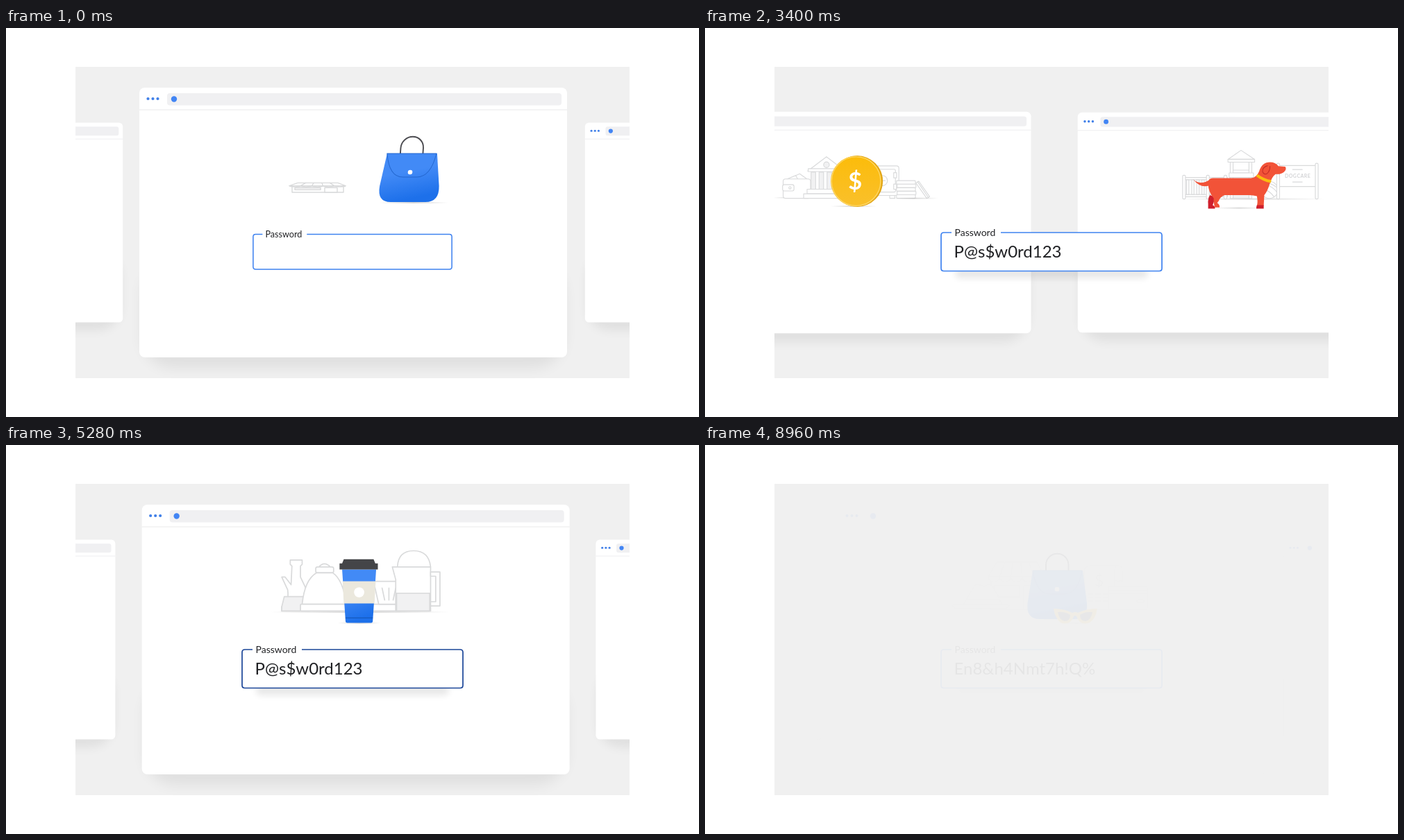
These frames come from a looping animation (998x561 px, 9.64 s). An HTML page:

```html
<!DOCTYPE html>
<html lang="en">
<head>
<meta charset="utf-8">
<title>Password reuse</title>
<style>
html, body { margin: 0; width: 100%; height: 100%; overflow: hidden; background: #fff; }
svg { display: block; width: 998px; height: 561px; }
text { font-family: Lato, sans-serif; fill: #202124; white-space: pre; }
.line { fill: #fff; stroke: #d9dadb; stroke-width: 1.4; stroke-linejoin: round; stroke-linecap: round; }
.line .none { fill: none; }
.line .tint { fill: #f1f1f2; }
.line text { fill: #d2d3d5; stroke: none; }
#shop * { vector-effect: non-scaling-stroke; }
</style>
</head>
<body>
<svg viewBox="0 0 998 561">
  <defs>
    <clipPath id="view"><rect x="100" y="56" width="798" height="449"/></clipPath>
    <filter id="soft" x="-20%" y="-60%" width="140%" height="220%"><feGaussianBlur stdDeviation="10"/></filter>
    <filter id="blur" x="-20%" y="-200%" width="140%" height="500%"><feGaussianBlur stdDeviation="5"/></filter>
    <linearGradient id="blue" x1="0" y1="0" x2=".25" y2="1">
      <stop offset=".45" stop-color="#428af6"/><stop offset="1" stop-color="#1d70ea"/>
    </linearGradient>
    <linearGradient id="gold" x1="0" y1="0" x2="0" y2="1">
      <stop offset="0" stop-color="#fcbc0a"/><stop offset="1" stop-color="#f9c02c"/>
    </linearGradient>
    <linearGradient id="ground">
      <stop offset="0" stop-color="#bbb" stop-opacity="0"/><stop offset=".5" stop-color="#bbb" stop-opacity=".6"/>
      <stop offset="1" stop-color="#bbb" stop-opacity="0"/>
    </linearGradient>
  </defs>
  <rect width="998" height="561" fill="#fff"/>
  <rect x="100" y="56" width="798" height="449" fill="#f0f0f0"/>
  <g clip-path="url(#view)"><g id="scene">
    <g id="pages"></g>
    <g id="menu">
      <rect x="350" y="362" width="298" height="50" rx="8" fill="#000" opacity=".14" filter="url(#blur)"/>
      <rect x="340" y="346" width="318" height="62" rx="5" fill="#fff"/>
      <rect id="row" x="341" y="354" width="316" height="50" fill="#e8f0fe"/>
      <g fill="none" stroke="#4285f4" stroke-width="2.4"><circle cx="366" cy="379" r="4.5"/><path d="M371 379H382V384M377 379V383"/></g>
      <text x="396" y="384" font-size="15">Suggest strong password</text>
    </g>
    <g id="field">
      <rect id="lift" x="360" y="346" width="278" height="15" rx="7" fill="#000" filter="url(#blur)"/>
      <rect x="340" y="295" width="318" height="55.500" rx="4" fill="#fff"/>
      <path id="edge" fill="none" stroke-width="1.700" d="M426 295H654q4 0 4 4V346.500q0 4 -4 4H344q-4 0 -4 -4V299q0 -4 4 -4H355"/>
      <text x="359.500" y="299.500" font-size="14">Password</text>
      <text id="word" x="358.500" y="330.500" font-size="24"></text>
    </g>
  </g></g>
</svg>
<script>
const LOOP = 9640, OLD = 'P@s$w0rd123', NEW = 'En8&h4Nmt7h!Q%';
const $ = id => document.getElementById(id);
const clamp = v => Math.max(0, Math.min(1, v));
const span = (t, a, b) => clamp((t - a) / (b - a));
const out = p => 1 - (1 - p) ** 3;
const smooth = p => p * p * (3 - 2 * p);
const inOut = p => p < .5 ? 2 * p * p : 1 - 2 * (1 - p) ** 2;
const mix = (a, b, p) => a + (b - a) * p;
const repeat = (n, f) => Array.from({ length: n }, (_, i) => f(i)).join('');
const path = (d, extra = '') => `<path d="${d}" ${extra}/>`;
const box = (x, y, w, h, r = 0, extra = '') => `<rect x="${x}" y="${y}" width="${w}" height="${h}" rx="${r}" ${extra}/>`;
const ground = (x, y, w) => box(x, y, w, 2, 1, 'fill="url(#ground)" stroke="none"');

const shop = `<g transform="translate(25)">
  <g class="line">
    <g id="shop">${box(387, 190, 74, 47)}${box(391, 203, 37, 16, 0, 'class="tint"')}${box(434, 203, 18, 34)}
      ${path('M395 169H453L464 190H383Z')}
      ${repeat(4, i => path(`M${406.6 + i * 11.6} 169L${399.2 + i * 16.2} 190`))}
      ${repeat(5, i => path(`M${383 + i * 16.2} 190a8.100 7.500 0 0 0 16.200 0Z`))}</g>
    <g id="hat">${ground(314, 235, 110)}
      ${path('M347 230L362 205Q365 199 371 202T381 202Q386 199 390 205L403 230Z')}
      ${path('M351 223H399L403 230H347Z', 'class="tint"')}
      ${path('M331 231Q333 229 337 230H407Q413 229 413 232Q410 236 403 236H340Q333 236 331 231Z')}</g>
    <g id="bill">${path('M521 237V183Q521 174 531 174H569Q576 174 576 182V197L573 195L570 197L567 195L565 197V182Q565 174 569 174')}
      ${path('M565 195V237H521', 'class="none"')}
      <text x="536" y="204" font-size="23">$</text>
      ${repeat(3, i => path(`M526 ${215 + i * 5}H534M537 ${215 + i * 5}H545M548 ${215 + i * 5}H556`))}</g>
    <g id="card">${ground(550, 236, 70)}${box(556, 204, 56, 33, 3)}${box(556, 209.5, 56, 5, 0, 'class="tint"')}${box(597, 223, 10, 4.5, 2)}</g>
  </g>
  <g id="bag">${ground(440, 251, 100)}
    ${path('M466 182V173a16 16 0 0 1 32.500 0V182', 'fill="none" stroke="#4b4b50" stroke-width="1.900"')}
    ${path('M447 181H519L525 228Q527 251 507 251H457Q437 251 439.500 228Z', 'fill="url(#blue)"')}
    ${path('M447 181Q452 215 472 215H492Q512 215 518 181Z', 'fill="none" stroke="#2367cf"')}
    <circle cx="482" cy="208" r="3.300" fill="#fff"/></g>
  <g id="shades">${ground(480, 256, 60)}
    ${path('M477 236Q492 236 504 242Q508 240 512 242Q524 236 539.500 236Q539 244 535 250Q530 258 522 257.500Q513 257 510 247Q508 245 506 247Q503 257 494 257.500Q486 258 482 250Q478 244 477 236Z', 'fill="#fcc12d"')}
    ${path('M483 241Q493 240 501 245Q501 254 493 254Q485 253 483 241ZM533 241Q523 240 515 245Q515 254 523 254Q531 253 533 241Z', 'fill="#4a4a4f"')}</g>
</g>`;

const bank = `<g transform="translate(5)">
  <g class="line">${ground(350, 236, 60)}
    ${path('M374 205L397 195L411 205')}${path('M373 205L390 198L394 205')}
    ${box(368, 204, 48, 34, 4)}${box(367, 214, 20, 11, 3)}<circle cx="380" cy="219.500" r="2"/>
    ${path('M411 190L444 165L477 190Z')}<circle cx="444" cy="179" r="5" class="tint"/>
    ${box(412, 186, 64, 5)}${repeat(4, i => box(417 + i * 14, 192, 8, 30, 0, 'class="tint"'))}
    ${box(410, 222, 70, 8)}${box(404, 230, 80, 8)}
    ${box(520, 181, 51, 52, 4)}${box(526, 187, 39, 40, 2)}<circle cx="542" cy="207" r="9"/>
    ${path('M542 202V212M537 207H547')}${box(562, 193, 5, 9)}${box(562, 213, 5, 9)}${box(555, 233, 9, 5)}
    ${repeat(5, i => box(567 + i % 2, 207 + i * 6.2, 33, 6.2, 1))}
    ${path('M601 211L606 208L625 235L620 238Z')}${path('M604 209L623 237')}${ground(560, 237, 80)}
  </g>
  ${ground(452, 251, 80)}
  <circle cx="498" cy="208" r="45" fill="#e0a51a"/><circle cx="496" cy="208" r="44.500" fill="url(#gold)"/>
  <circle cx="496" cy="208" r="43" fill="none" stroke="#fdd768" stroke-width="1.500"/>
  <text x="494.500" y="223" font-size="42" font-weight="700" text-anchor="middle" style="fill:#fff">$</text>
</g>`;

const dog = `<g transform="translate(-6)">
  <g class="line">${ground(375, 238, 260)}
    ${box(386, 201, 76, 4)}${box(386, 231, 76, 4)}${repeat(7, i => box(390 + i * 9, 205, 4, 26))}
    ${box(383, 197, 5, 42, 2)}${box(425, 197, 5, 42, 2)}${box(456, 197, 5, 42, 2)}
    ${box(467, 172, 5, 66)}${box(500, 172, 5, 66)}${box(472, 188, 28, 5)}${box(465, 193, 43, 8)}
    ${path('M463 169L486 153L510 169Z')}${box(463, 169, 47, 5)}${box(472, 205, 28, 33, 0, 'class="tint"')}
    <circle cx="536" cy="223" r="15"/>${path('M526 212Q544 218 550 228M530 210Q548 214 551 222M522 220Q538 225 544 235', 'class="none"')}
    ${box(553, 180, 66, 37)}${box(549, 176, 5, 63, 2)}${box(617, 176, 5, 63, 2)}
    ${path('M577 187H594M577 209H594')}
    <text x="586" y="201" font-size="8.500" font-weight="700" letter-spacing=".6" text-anchor="middle">DOGCARE</text>
  </g>
  ${ground(440, 254, 85)}
  ${path('M431 232Q427 238 428 247L428 256H440Q441 252 436 250Q438 242 443 236Z', 'fill="#cf1f2c"')}
  <g id="tail">${path('M416 181Q416 199 436 204L434 213Q411 206 416 181Z', 'fill="#f25338"')}</g>
  ${path('M436 202H504Q514 201 518 190Q523 174 537 174Q547 174 552 181L564 182Q567 187 562 191Q556 196 547 195Q541 199 537 211Q533 225 527 232L526 251H514Q516 244 514 234Q508 232 500 232H457Q449 235 447 242L444 246Q449 249 448 254H440Q437 246 438 238Q428 226 428 212Q428 202 436 202Z', 'fill="#f25338"')}
  ${path('M514 250H526V256H513Q513 252 514 250Z', 'fill="#cf1f2c"')}
  ${path('M533 180Q523 183 524 191Q527 197 532 194Q537 190 537 181', 'fill="none" stroke="#c22a24" stroke-width="1.300"')}
  ${path('M514 197Q526 206 539 208', 'fill="none" stroke="#fbbc0f" stroke-width="5"')}
</g>`;

const coffee = `<g transform="translate(500 280.500) scale(1.225) translate(-796 -280.500)">
  <g class="line">${ground(696, 247, 210)}
    ${path('M719 187H733V192L731 194V207L742 230V247H709V242Q718 238 716 222L709 207H713L720 216L721 194L719 192Z')}
    ${path('M712 230H741V247H709V242Z', 'class="tint"')}
    ${path('M752 196Q759 187 767 196', 'class="none"')}${box(749, 195, 21, 7, 2)}
    ${path('M733 239Q736 210 750 202H769Q781 210 785 239Z')}${box(731, 239, 124, 8, 1)}
    ${path('M817 212H857L846 239H823Z')}${path('M827 220L830 234M835 220V234M843 220L840 234')}
    ${path('M845 195Q846 176 864 176Q882 176 884 195Z')}
    ${path('M839 195H884V247H843V210Z')}${box(844, 226, 39, 21, 0, 'class="tint"')}
    ${path('M884 201H895V241H884V236H890V206H884Z')}
  </g>
  ${ground(775, 260, 50)}
  ${path('M780 198H820L816 259Q816 261 813 261H787Q784 261 784 259Z', 'fill="url(#blue)"')}
  ${path('M780.500 212H819.500L818 238H782Z', 'fill="#ebe8dd"')}<circle cx="800" cy="225" r="6" fill="#fff"/>
  ${path('M784 255H816', 'stroke="#1559bd"')}
  ${path('M782 186H817L819 191H822V198H777V191H780Z', 'fill="#444548"')}
</g>`;

const book = `${ground(420, 248, 125)}
  ${path('M432 172H530V246H492Q481 250 470 246H432Z', 'fill="#34a08a"')}
  ${path('M436 170Q463 167 481 175Q499 167 526 170V240Q499 237 481 245Q463 237 436 240Z', 'fill="#e4f1ee" stroke="#8cc8ba"')}
  ${path('M481 175V245', 'stroke="#8cc8ba"')}`;

const frameArt = art => `<g>
  ${box(196, 340, 608, 150, 44, 'fill="#000" opacity=".065" filter="url(#soft)"')}
  ${box(192, 86, 616, 389, 8, 'fill="#fff"')}${box(192, 117.5, 616, 1, 0, 'fill="#eaeaeb"')}
  ${repeat(3, i => `<circle cx="${204.5 + i * 7}" cy="102" r="2.100" fill="#3f7fe8"/>`)}
  ${box(232, 94, 568, 17.5, 4, 'fill="#f0f0f2"')}<circle cx="242" cy="102.500" r="4.200" fill="#4285f4"/>
  ${art}</g>`;

const stops = [-560, 0, 562, 1133.5, 1708, 2282];
$('pages').innerHTML = ['', shop, bank, dog, coffee, book].map(frameArt).join('');
const pages = [...$('pages').children];
const slides = [1142, 2614, 4193, 5345, 6198];

function camera(t) {
  let x = 0;
  for (let i = 0; i < 4; i++)
    x += (stops[i + 2] - stops[i + 1]) * inOut(span(t, slides[i], slides[i + 1]));
  return x;
}

function place(el, sx, sy, x, y) {
  el.setAttribute('transform', `translate(${x * (1 - sx)} ${y * (1 - sy)}) scale(${sx} ${sy})`);
}

function fade(t) {
  if (t < 5640) return 1;
  if (t < 6040) return Math.max(.03, 1 - (t - 5640) / 200);
  if (t < 8760) return clamp((t - 6000) / 200);
  return Math.max(.05, 1 - (t - 8760) / 200);
}

function build(t) {
  place($('shop'), 1, mix(.2, 1, out(span(t, 0, 450))), 424, 237);
  [['hat', 100, 425], ['bill', 180, 530], ['card', 280, 545]].forEach(([id, at, x]) => {
    const k = out(span(t, at, at + 450));
    place($(id), k, k, x, 237);
  });
  const k = 1 - out(span(t, 0, 700));
  $('bag').setAttribute('transform', `matrix(1 0 ${-.07 * k} 1 ${(72 + .07 * 251) * k} 0)`);
  const pop = out(span(t, 480, 780));
  place($('shades'), pop, pop, 508, 250);
}

function typed(t) {
  if (t < 6040) return OLD.slice(0, Math.floor(span(t, 240, 860) * OLD.length));
  if (t < 7340) return OLD.slice(0, Math.ceil((1 - span(t, 6320, 6800)) * OLD.length));
  return NEW.slice(0, Math.floor(span(t, 7320, 8240) * NEW.length));
}

function draw(t) {
  const second = t >= 6040, cam = second ? 0 : camera(t);
  $('scene').setAttribute('opacity', fade(t));
  pages.forEach((p, i) => {
    const dx = stops[i] - cam, s = 1 - .259 * smooth(clamp(Math.abs(dx) / 568 / .79));
    p.setAttribute('transform', `translate(${500 + dx} 280.5) scale(${s}) translate(-500 -280.5)`);
  });
  build(t);
  $('tail').setAttribute('transform', `rotate(${25 * Math.cos((t - 4080) / 453.3 * 2 * Math.PI) - 25} 434 208)`);

  const lift = smooth(span(t, 800, 1100));
  place($('field'), mix(.9, 1, lift), mix(.91, 1, lift), 499, 322.5);
  $('lift').setAttribute('opacity', .09 * lift);
  const dark = second ? 0 : Math.max(0, ...slides.slice(1, 4).map(s => 1 - Math.abs(t - s + 80) / 350));
  $('edge').setAttribute('stroke', `rgb(${mix(62, 24, dark)},${mix(130, 66, dark)},${mix(240, 148, dark)})`);
  $('word').textContent = typed(t);

  const open = second ? out(span(t, 6840, 7200)) : 0;
  place($('menu'), 1, open, 499, 350);
  $('menu').setAttribute('opacity', open ? 1 - span(t, 8760, 8960) : 0);
  $('row').setAttribute('opacity', span(t, 7360, 7480));
}

function tick(now) {
  draw(Math.floor(now % LOOP / 40) * 40);
  requestAnimationFrame(tick);
}
draw(0);
requestAnimationFrame(tick);
</script>
</body>
</html>
```
